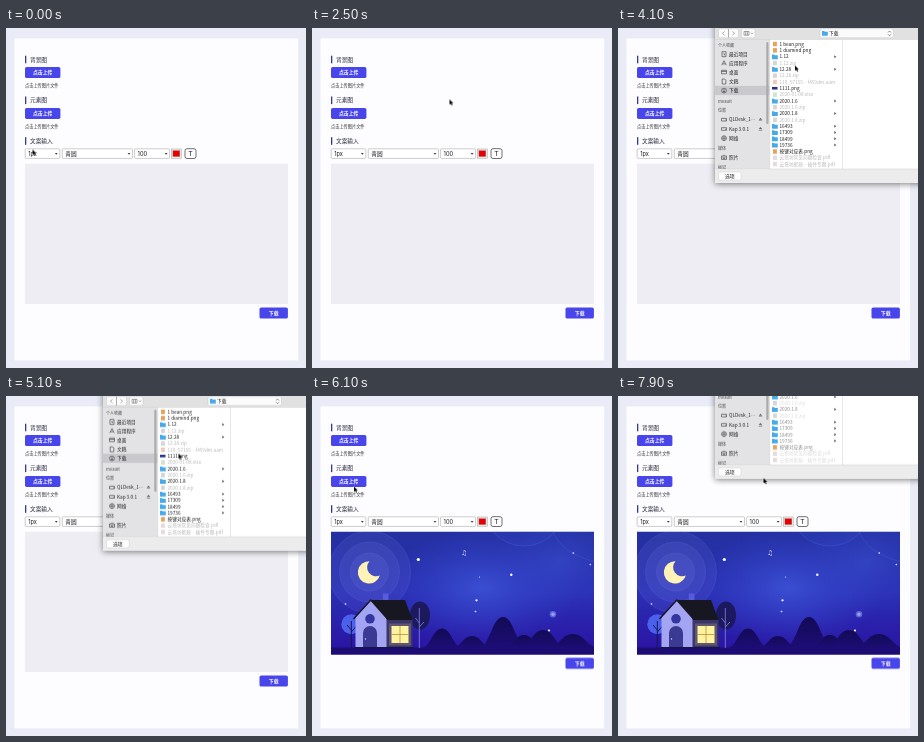
These frames come from a looping animation (300x340 px, 8 s). An HTML page:

```html
<!DOCTYPE html>
<html lang="zh-CN">
<head>
<meta charset="utf-8">
<title>图片编辑</title>
<style>
html, body { margin: 0; width: 100%; height: 100%; overflow: hidden; background: #e9ecf6; }
svg { display: block; width: 100vw; height: 100vh; }
text { font-family: "Noto Sans CJK SC", "Noto Sans CJK", sans-serif; white-space: pre; }
.latin { font-family: Inter, "Noto Sans CJK SC", sans-serif; }
.cursor, .sheet, .blank, .names, .scene, .save { animation: 8s linear infinite; }
.cursor { animation-name: cursor; }
.sheet { animation-name: sheet; filter: drop-shadow(0 1.5px 3px rgba(0,0,0,.5)); }
.blank, .names, .scene, .save { animation-timing-function: step-end; }
.blank { animation-name: blank; }
.names { animation-name: names; }
.scene { animation-name: scene; }
.save { animation-name: save; }
@keyframes cursor {
  0%, 2.5% { transform: translate(26.5px, 121.5px); }
  11.25% { transform: translate(48px, 46px); }
  15% { transform: translate(27px, 44px); }
  22.5% { transform: translate(152px, 108px); }
  31.25% { transform: translate(138px, 71.5px); }
  33.75% { transform: translate(32px, 44px); }
  37.5%, 45% { transform: translate(32px, 46px); }
  46.25% { transform: translate(58px, 46px); }
  51.25%, 55% { transform: translate(177px, 37.5px); }
  61.25%, 67.5% { transform: translate(172.5px, 57.5px); }
  75%, 80% { transform: translate(42px, 90.5px); }
  87.5%, 95% { transform: translate(42px, 87px); }
  98.75%, 100% { transform: translate(145.5px, 82px); }
}
@keyframes sheet {
  0%, 41.25% { transform: translateY(-170px); }
  42.5% { transform: translateY(-125px); }
  43.75% { transform: translateY(-72px); }
  45% { transform: translateY(-38px); }
  46.25% { transform: translateY(-9px); }
  47.5%, 63.75% { transform: translateY(0); }
  65% { transform: translateY(-20px); }
  66.25% { transform: translateY(-58px); }
  67.5% { transform: translateY(-103.5px); }
  68.75% { transform: translateY(-142px); }
  70%, 96.25% { transform: translateY(-170px); }
  97.5% { transform: translateY(-125px); }
  98.75% { transform: translateY(-72.5px); }
  100% { transform: translateY(-38px); }
}
@keyframes blank { 0% { opacity: 0; } 65% { opacity: 1; } 90%, 100% { opacity: 0; } }
@keyframes names { 0% { opacity: .5; } 47.5% { opacity: 1; } 90%, 100% { opacity: .5; } }
@keyframes scene { 0% { opacity: 0; } 71.25%, 100% { opacity: 1; } }
@keyframes save { 0% { transform: none; } 71.25%, 100% { transform: translateY(-17.7px); } }
</style>
</head>
<body>
<svg viewBox="0 0 300 340" preserveAspectRatio="none">
  <defs>
    <linearGradient id="sky" x2="0" y2="1">
      <stop offset="0" stop-color="#2430a0"/>
      <stop offset=".5" stop-color="#2a2fb4"/>
      <stop offset="1" stop-color="#2a12a2"/>
    </linearGradient>
    <radialGradient id="haze">
      <stop offset="0" stop-color="#4058dc" stop-opacity=".75"/>
      <stop offset="1" stop-color="#3448d0" stop-opacity="0"/>
    </radialGradient>
    <linearGradient id="hill" x2="0" y2="1">
      <stop offset="0" stop-color="#120b55"/>
      <stop offset="1" stop-color="#1d0d78"/>
    </linearGradient>
    <clipPath id="frame"><rect x="19" y="135.7" width="263" height="122.8"/></clipPath>
  </defs>

  <rect width="300" height="340" fill="#e9ecf6"/>
  <rect x="8.5" y="10.3" width="283.7" height="322" fill="#fdfdff"/>
  <g id="form"></g>
  <rect x="19" y="135.7" width="263" height="140.3" fill="#ededf3"/>

  <g class="scene">
    <rect x="18" y="135" width="265" height="142" fill="#fdfdff"/>
    <g clip-path="url(#frame)">
      <rect x="19" y="135" width="263" height="124" fill="url(#sky)"/>
      <ellipse cx="170" cy="192" rx="95" ry="60" fill="url(#haze)"/>
      <ellipse cx="250" cy="165" rx="70" ry="55" fill="url(#haze)" opacity=".6"/>
      <g id="halos" fill="#9ba8ff" fill-opacity=".09" stroke="#8795f0" stroke-opacity=".35" stroke-width=".4"></g>
      <circle cx="212" cy="109" r="41" fill="#3b50d0" fill-opacity=".15" stroke="#5b7cf0" stroke-opacity=".6" stroke-width=".4"/>
      <path d="M240 134Q250 158 284 166" fill="none" stroke="#5b7cf0" stroke-opacity=".5" stroke-width=".4"/>
      <path d="M57.5 165.2A11.2 11.2 0 1 0 67.8 179.5A9 9 0 0 1 57.5 165.2Z" fill="#fff2b6"/>
      <g id="stars" fill="#fff"></g>
      <circle cx="241" cy="218.3" r="3.3" fill="#8fa0ff" opacity=".5"/>
      <circle cx="241" cy="218.3" r="1.7" fill="#aebcff" opacity=".7"/>
      <text x="149.3" y="159" font-size="6.5" fill="#fff" style="font-family:'DejaVu Sans',sans-serif">♫</text>
      <g id="hills" fill="url(#hill)"></g>
      <path d="M19 251.5H282V259H19Z" fill="#1d0c74"/>
      <ellipse cx="108" cy="219.5" rx="10" ry="14" fill="#1c195e"/>
      <path d="M107.3 212V252M107.3 231L112 226M107.3 227L103.500 222" fill="none" stroke="#8587dd" stroke-width=".8"/>
      <circle cx="39.3" cy="228.3" r="10" fill="#4c60ee"/>
      <path d="M39.3 225V252M39.3 236L44.500 230M39.3 234L35 229" fill="none" stroke="#17164f" stroke-width="1"/>
      <path d="M70.800 197.500H76.500V213H70.800Z" fill="#575be0"/>
      <path d="M74 223H100.500V252H74Z" fill="#3c3568"/>
      <path d="M58.500 204H93L100.500 224H75Z" fill="#171722"/>
      <path d="M43.500 221L58.800 204.500L74.500 222V252H43.500Z" fill="#a3a5f3"/>
      <path d="M41.500 223L58.800 204L76 223.500" fill="none" stroke="#171722" stroke-width="1.500"/>
      <circle cx="58" cy="222.800" r="4.800" fill="#3436a0"/>
      <path d="M51 252V237A7 7 0 0 1 65 237V252Z" fill="#3b3a92"/>
      <circle cx="53.500" cy="243" r=".7" fill="#d9d9ff"/>
      <rect x="77" y="227.500" width="22" height="22" fill="#fff09a" opacity=".18"/>
      <rect x="79.500" y="230" width="17" height="17" fill="#fff3a0"/>
      <path d="M88 230V247M79.500 238.500H96.500" stroke="#b58d43" stroke-width=".8"/>
      <path d="M42 251H102V252.500H42Z" fill="#16124c"/>
    </g>
  </g>
  <g class="save" id="save"></g>

  <g class="sheet">
    <rect x="97" y="-14" width="210" height="169" fill="#ececec"/>
    <rect x="97" y="-14" width="210" height="25.500" fill="#e2e1e2"/>
    <g fill="#fbfbfb" stroke="#bcbcbc" stroke-width=".4">
      <rect x="100.500" y=".8" width="20" height="9" rx="1.500"/>
      <rect x="123.500" y=".8" width="13.500" height="9" rx="1.500"/>
      <rect x="202" y=".8" width="73.500" height="9" rx="1.500"/>
    </g>
    <path d="M106.500 3.500L104.500 5.300L106.500 7.100M114.500 3.500L116.500 5.300L114.500 7.100M110.500 1V9.700" fill="none" stroke="#777" stroke-width=".6"/>
    <path d="M126 3.500H131V7.200H126ZM127.700 3.500V7.200M129.400 3.500V7.200M133 4.700L134 5.800L135 4.700" fill="none" stroke="#555" stroke-width=".5"/>
    <path d="M270 4.500L271.500 3L273 4.500M270 6.300L271.500 7.800L273 6.300" fill="none" stroke="#444" stroke-width=".6"/>
    <path d="M97 11.500H151.500V141H97Z" fill="#e3e2e5"/>
    <path d="M151.800 11.500H307V141H151.800Z" fill="#fff"/>
    <path d="M97 11.500H307M97 141H307M151.700 11.500V141M224.500 11.500V141" stroke="#cfcfcf" stroke-width=".5"/>
    <rect x="97" y="57.800" width="54.500" height="9.300" fill="#c9c8cc"/>
    <rect x="148.300" y="14" width="2.200" height="82" rx="1.100" fill="#aaa9ac"/>
    <g id="places"></g>
    <g id="files"></g>
    <g class="blank">
      <path d="M97 -14H307V141H97Z" fill="#e9e9e9"/>
      <path id="lines" stroke="#e2e2e2" stroke-width=".5"/>
      <path d="M97 141H307" stroke="#d8d8d8" stroke-width=".5"/>
    </g>
    <rect x="100.500" y="144" width="22.500" height="8" rx="1.500" fill="#fff" stroke="#c4c4c4" stroke-width=".4"/>
    <text x="111.800" y="149.900" font-size="4.900" text-anchor="middle" fill="#222">选项</text>
  </g>

  <g class="cursor">
    <path d="M0 0V5.300L1.250 4.200L2.150 6.200L3.050 5.800L2.200 3.900H3.800Z" fill="#000" stroke="#fff" stroke-width=".7" paint-order="stroke"/>
  </g>
</svg>
<script>
const put = (id, html) => document.getElementById(id).innerHTML = html;
const text = (x, y, size, str, fill = '#222', extra = '') =>
  `<text x="${x}" y="${y + size * .37}" font-size="${size}" fill="${fill}" ${extra}>${str}</text>`;
const box = (x, y, w, h, extra) => `<rect x="${x}" y="${y}" width="${w}" height="${h}" ${extra}/>`;
const dot = (x, y, r) => `<circle cx="${x}" cy="${y}" r="${r}"/>`;

const button = (x, y, w, str) => box(x, y, w, 11, 'rx="1.7" fill="#4845ea"') +
  text(x + w / 2, y + 5.5, 4.9, str, '#fff', 'text-anchor="middle" font-weight="700"');
const title = (y, str) => box(19, y - 3.8, 1.3, 7.6, 'fill="#37388f"') +
  text(24, y, 5.7, str, '#28283c', 'font-weight="500"');
const upload = (y, str) => title(y, str) + button(19, y + 7.6, 35.4, '点击上传') +
  text(19, y + 26, 4.2, '点击上传图片文件', '#333');
const select = (x, w, str) =>
  box(x, 120.8, w, 9.6, 'rx="1" fill="#fff" stroke="#a9a9a9" stroke-width=".6"') +
  text(x + 3, 125.7, 5.7, str, '#222', 'class="latin"') +
  `<path d="M${x + w - 5} 125h3l-1.500 1.800z" fill="#444"/>`;

put('form', upload(31.5, '背景图') + upload(72.3, '元素图') + title(113, '文案输入') +
  select(19.2, 34.6, '1px') + select(56.3, 70.2, '青圆') + select(128.6, 35, '100') +
  box(165.4, 121, 9.8, 9.2, 'fill="#eee" stroke="#999" stroke-width=".5"') +
  box(166.9, 122.6, 6.900, 6, 'fill="#e80000" stroke="#777" stroke-width=".3"') +
  box(179, 120.7, 11, 9.8, 'rx="2" fill="#fff" stroke="#333" stroke-width=".7"') +
  text(184.5, 125.7, 6.8, 'T', '#222', 'text-anchor="middle" class="latin"'));
put('save', button(253.5, 279.6, 28.4, '下载'));

// Night scene
put('halos', [19, 30, 41].map(r => dot(57.5, 176, r)).join(''));
put('stars', [[106.3, 163.5, 1.6], [199.3, 178.8, 1.2], [164.5, 204.3, 1.1], [163.5, 215.5, .8],
  [237, 234.5, 1.1], [261.3, 157, .8], [278.3, 168.5, .7], [33.5, 208, .8], [167.5, 181, .5],
  [110, 206.5, .6]].map(s => dot(...s)).join(''));
put('hills', [[130, 232.5, 21], [160, 240, 20], [191, 221, 25], [212, 239, 20], [231, 234, 24], [261, 238, 26]]
  .map(([x, y, w]) => `<path d="M${x - w} 253C${x - w * .5} 250 ${x - w * .45} ${y} ${x} ${y}S${x + w * .5} 250 ${x + w} 253Z"/>`)
  .join(''));

// File dialog
const folder = (x, y) =>
  `<path d="M${x} ${y - 2.2}h2.200l.6 .7h3v4h-5.800z" fill="#45a9ea"/>`;
const heads = [[18, '个人收藏'], [73.7, 'mVault'], [83, '位置'], [121, '媒体'], [139.2, '标记']];
const items = [[26.2, '最近项目'], [35.2, '应用程序'], [44.3, '桌面'], [53.5, '文稿'], [62.6, '下载'],
  [91.7, 'QLDesk_1…'], [101, 'Kap 3.0.1'], [110.2, '网络'], [129.5, '照片']];
const glyphs = [
  'M-2-2.500H2V2.500H-2ZM0-1V.5H1', 'M-2.200 2L0-2.500L2.200 2M-1.500 .7H1.500', 'M-2.500-2H2.500V1.500H-2.500ZM-2.500-.8H2.500',
  'M-1.800-2.500H.7L1.800-1.300V2.500H-1.800Z', 'M-2.400 0A2.400 2.400 0 1 0 2.400 0A2.400 2.400 0 1 0-2.400 0M0-1.500V1.500M-1 .4L0 1.500L1 .4',
  'M-2.500-1.300H2.500V1.300H-2.500ZM1 .3H1.700', 'M-2.500-1.300H2.500V1.300H-2.500ZM1 .3H1.700',
  'M-2.400 0A2.400 2.400 0 1 0 2.400 0A2.400 2.400 0 1 0-2.400 0H2.400M0-2.400V2.400', 'M-2.500-1.500H-1L-.5-2.200H.5L1-1.500H2.500V1.900H-2.500ZM-1 .2A1 1 0 1 0 1 .2A1 1 0 1 0-1 .2'];
const eject = y => `<path d="M140.800 ${y}l1.700-2l1.700 2zM140.800 ${y + .7}h3.400v.7h-3.400z" fill="#666"/>`;
put('places', folder(204, 5.3) + text(211, 5.4, 4.7, '下载') +
  `<g clip-path="inset(0)">` + heads.map(([y, s]) => text(100, y, 4, s, '#77777a', 'font-weight="700"')).join('') + '</g>' +
  items.map(([y, s], i) => `<path transform="translate(106 ${y})" d="${glyphs[i]}" fill="none" stroke="#4c4c50" stroke-width=".7"/>` +
    text(111, y, 4.7, s)).join('') + eject(91.7) + eject(101) +
  box(97, 141.2, 54.5, 4, 'fill="#ececec"'));

const files = ['1 bean.png', '1 diamind.png', '1.12/', '1.12.zip', '12.28/', '12.28.zip', '110_57155…f459dm.aam',
  '1111.png', '2020-01-08.xlsx', '2020.1.6/', '2020.1.6.zip', '2020.1.8/', '2020.1.8.zip',
  '16493/', '17309/', '18499/', '19736/', '按键对应表.png', '云塔坊常见问题检查.pdf', '云塔坊星辰…插件专题.pdf'];
const tints = { png: '#e9a25c', zip: '#d6d6d6', aam: '#efc9bd', xlsx: '#cfe3d2', pdf: '#e4dcda' };
const fileIcon = (name, y) => name.endsWith('/') ? folder(154, y)
  : name === '1111.png' ? box(154, y - 1.300, 5.500, 2.600, 'fill="#25358f"')
  : box(155, y - 2.200, 3.900, 4.500, `fill="${tints[name.split('.').pop()]}"`);
const rows = files.map((name, i) => ({ name, y: 16 + i * 6.32 }));
put('files', rows.map(({ name, y }) => fileIcon(name, y) +
    (name.endsWith('/') ? `<path d="M216.300 ${y - 1.500}l2 1.500l-2 1.500z" fill="#555"/>` : '')).join('') +
  '<g class="names">' + rows.map(({ name, y }) => text(161.5, y, 4.7, name.replace('/', ''),
    /(png|\/)$/.test(name) ? '#1c1c1c' : '#b9b9b9')).join('') + '</g>');
document.getElementById('lines').setAttribute('d',
  Array.from({ length: 20 }, (_, i) => `M97 ${14 + i * 6.32}H307`).join(''));
</script>
</body>
</html>
```
